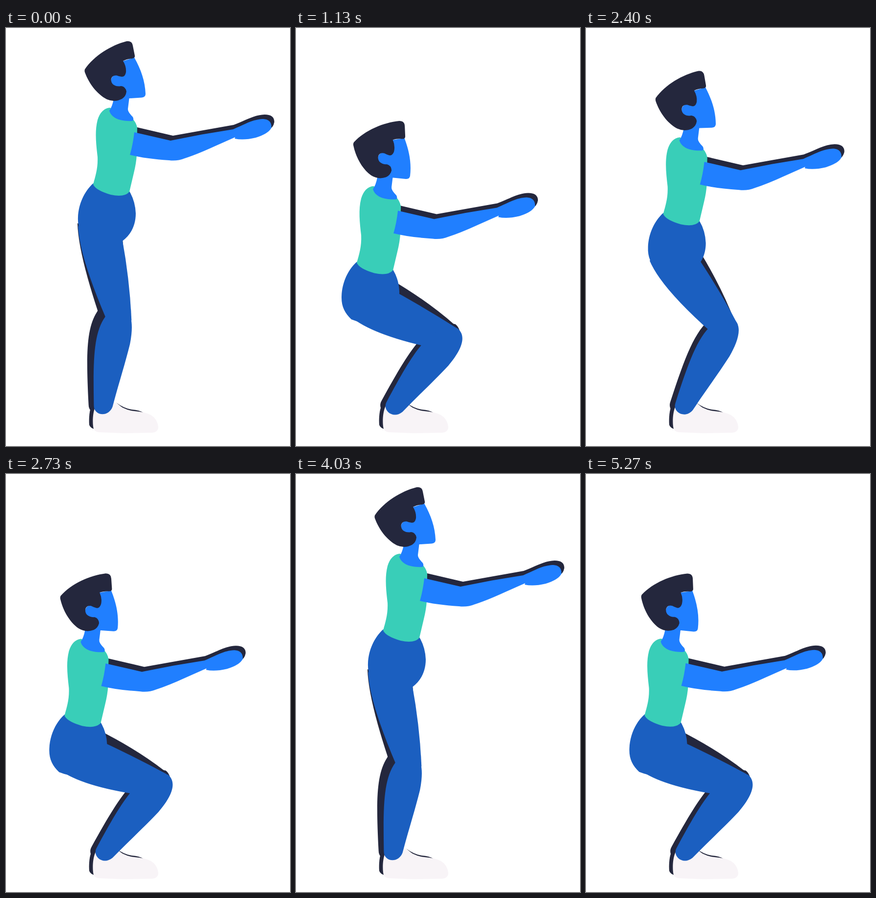
Write an HTML page that moves like this. It is 580 by 850 pixels and loops after 5310 ms.

```html
<!DOCTYPE html>
<html lang="en">
<head>
<meta charset="utf-8">
<title>Squats</title>
<style>
  html, body { margin: 0; width: 100%; height: 100%; overflow: hidden; background: #fff; }
  svg { display: block; width: 580px; height: 850px; }
  .dark { fill: #24273d; }
  .skin { fill: #207fff; }
  .pants { fill: #1b5fc0; }
  .shirt { fill: #39ceb8; }
  .shoe { fill: #f8f4f7; }
</style>
</head>
<body>
<svg viewBox="0 0 580 850">
  <defs>
    <!-- Lower leg, standing on its ankle at 0,0 -->
    <path id="shin" d="M-19 -4 C-16 16 14 16 19 -8 C24 -60 30 -100 33 -140 C34 -175 28 -211 0 -211 L-20 -200 L-26 -186 C-44 -150 -36 -95 -19 -4 Z"/>
  </defs>
  <path class="dark body" d="M255 199 L268 202 L341 219 L400 208.500 L465 197 C490 188 505 177 528 176 Q548 176 548 191 Q546 203 536 207 L341 240 L255 240 Z"/>
  <g class="dark">
    <path id="farThigh"/><use id="farShin" href="#shin"/>
    <path d="M176 766 C170 775 169 795 170 807 Q172 814 183 816 L210 816 L205 768 Z"/>
    <path d="M224 761 Q241 774 258 776 Q272 777 280 782 L250 782 Z"/>
  </g>
  <path class="shoe" d="M183 769 C177 780 176 805 179 815 Q181 821 190 822 L240 824 L298 823 Q311 822 311 811 Q309 795 296 787 Q285 781 262 779 Q240 777 219 759 Z"/>
  <g class="pants">
    <path id="nearThigh"/><use id="nearShin" href="#shin"/>
    <path class="body" d="M178 316 C160 332 148 358 147 385 C146 406 153 420 167 433 C195 444 222 442 238 433 C256 420 265 400 265 377 Q264 352 252 332 Z"/>
  </g>
  <g class="body">
    <path class="shirt" d="M212 162 Q194 164 187 187 C181 210 184 236 187 262 C188 285 183 300 178 318 Q183 330 214 339 Q242 345 252 333 L261 295 Q266 275 267 258 L268 203 Q266 192 258 184 Z"/>
    <path class="skin" d="M220 144 Q217 160 211 168 Q214 180 230 186 Q245 190 258 189 Q262 187 259 181 Q248 170 249 164 L252 140 Z"/>
    <g id="head">
      <g class="skin">
        <path d="M230 70 L262 60 C276 85 284 108 285 134 Q285 141 277 141.500 L252 143 L228 146 Z"/>
        <circle cx="227" cy="107" r="12.500"/>
      </g>
      <path class="dark" d="M161 84 C180 56 215 35 246 27 Q257 25 259 36 L263 56 Q264 61 258 62 Q246 63 239 67 Q246 78 245 90 Q243 100 236 99 Q230 98 226 96.500 C213 95 212 109 219 115 Q226 120 235 118 Q244 119 246 129 Q245 139 237 144 Q222 152 206 145 C185 134 169 112 161 90 Q160 87 161 84 Z"/>
    </g>
    <path class="skin" d="M262 212 L336 229 L400 216.500 L464 206 C490 195 503 186 525 185 Q543 186 542 203 Q536 215 510 223 Q485 229 467 225 L468 222 L425 241 Q390 257 365 265 Q350 271 333 269 Q285 266 253 258 Q259 238 262 212 Z"/>
  </g>
</svg>
<script>
const LOOP = 5310, STEP = 33.34, LAST = 158;
const DROP = 192, LEAN = -0.338, TILT = 9, HEAD_LAG = 2.2;
const SHIN = 181.5;
const DOWN = { x1: 0.34, x2: 0.4, span: 25 };
const UP = { x1: 0.25, x2: 0.27, span: 23.5 };

// Steps at which the figure starts to sink, rise, sink, rise ...
const starts = [0.85, 30.1, 64.35, 93.5, 127.2, 155];

// slim: how much the front of the thigh flattens when bent
const near = { name: "near", hip: [165.5, 387], ankle: [197.5, 775], thigh: 218, shin: SHIN, slim: 10, rear: 22 };
const far = { name: "far", hip: [170.5, 382], ankle: [187, 773], thigh: 207.5, shin: 189, slim: -2, rear: 27 };

const el = id => document.getElementById(id);
const bodies = document.querySelectorAll(".body");
const place = (node, transform) => node.setAttribute("transform", transform);
const degrees = (y, x) => Math.atan2(y, x) * 180 / Math.PI;

// Cubic Bezier easing through (x1, 0) and (x2, 1)
function ease({ x1, x2 }, t) {
  if (t >= 1) return 1;
  let lo = 0, hi = 1, u = 0.5;
  for (let i = 0; i < 24; i++) {
    u = (lo + hi) / 2;
    const v = 1 - u;
    if (3 * x1 * u * v * v + 3 * x2 * u * u * v + u * u * u < t) lo = u; else hi = u;
  }
  return u * u * (3 - 2 * u);
}

// 0 standing, 1 at the bottom of the squat
function depth(n) {
  const i = starts.filter(s => s <= n).length - 1;
  if (i < 0) return 0;
  const sinking = i % 2 === 0, move = sinking ? DOWN : UP;
  const e = ease(move, (n - starts[i]) / move.span);
  return sinking ? e : 1 - e;
}

// Upper leg hanging from the hip at 0,0
function thighPath({ thigh, slim, rear }, bend) {
  const end = thigh - 10;
  return `M${57 - slim * bend} 60
    Q${48 - 0.8 * slim * bend} 145 28 ${thigh + 7}
    L${-20.5 - 5.5 * bend} ${end}
    Q${-37 - 20 * bend} 68 ${-rear - 14 * bend} 10 Z`;
}

function drawLeg(leg, dx, dy) {
  const { name, thigh, shin, ankle: [ax, ay] } = leg;
  const hx = leg.hip[0] + dx, hy = leg.hip[1] + dy;

  // Knee from the two bone lengths, always bending forward
  const c = Math.hypot(ax - hx, ay - hy);
  const ux = (ax - hx) / c, uy = (ay - hy) / c;
  const along = (thigh ** 2 - shin ** 2 + c * c) / (2 * c);
  const out = Math.sqrt(Math.max(0, thigh ** 2 - along ** 2));
  const kx = hx + ux * along + uy * out;
  const ky = hy + uy * along - ux * out;

  const swing = degrees(kx - hx, ky - hy);
  const bend = Math.max(0, (swing - 16.4) / 52.9);
  el(name + "Thigh").setAttribute("d", thighPath(leg, bend));
  place(el(name + "Thigh"), `translate(${hx} ${hy}) rotate(${-swing})`);
  place(el(name + "Shin"),
    `translate(${ax} ${ay}) rotate(${degrees(kx - ax, ay - ky)}) scale(1 ${shin / SHIN})`);
}

function draw() {
  const t = performance.now() % LOOP;
  const n = Math.min(LAST, Math.floor((t + 4) / STEP));
  const dy = DROP * depth(n), dx = LEAN * dy;
  bodies.forEach(b => place(b, `translate(${dx} ${dy})`));
  place(el("head"), `rotate(${TILT * depth(n - HEAD_LAG)} 238 150)`);
  drawLeg(far, dx, dy);
  drawLeg(near, dx, dy);
  requestAnimationFrame(draw);
}
draw();
</script>
</body>
</html>
```
